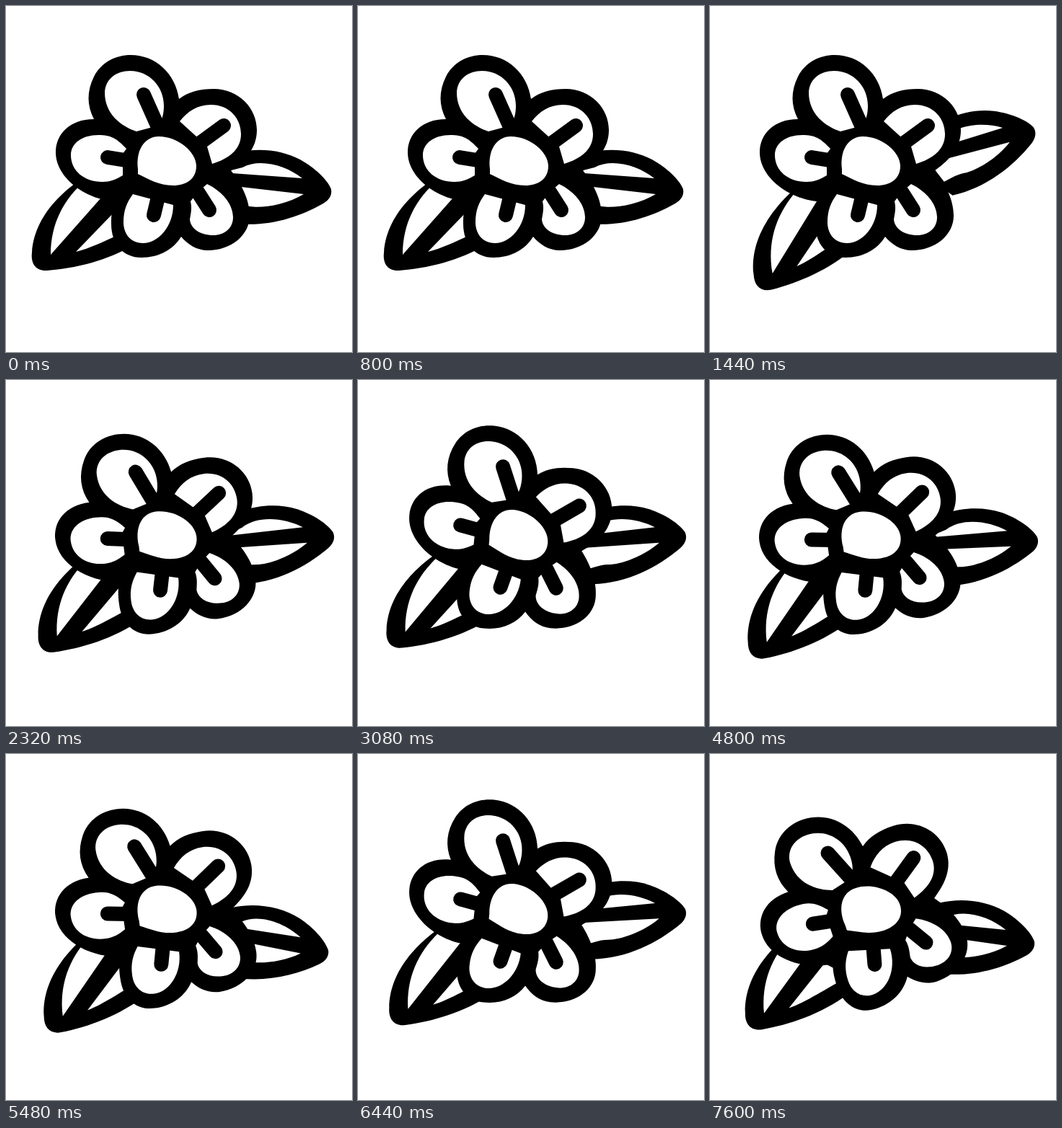
Animation, 480 px wide and 480 px high, one loop 7.68 s. Source, as an HTML page:

```html
<!DOCTYPE html>
<html lang="en">
<head>
<meta charset="utf-8">
<title>Wobbling flower</title>
<style>
html, body { margin: 0; width: 100%; height: 100%; overflow: hidden; background: #fff; }
svg { display: block; width: 100vw; height: 100vh; }
.hole { fill: #fff; }
.line { fill: none; stroke: #000; stroke-width: 20; stroke-linecap: round; }
</style>
</head>
<body>
<svg viewBox="0 0 480 480">
  <g id="left">
    <path d="M130 225C95 243 40 282 36 342C34 358 42 368 57 367C95 364 140 354 180 330L190 250Z"/>
    <path class="hole" d="M62 345C62 302 80 268 110 242L140 257ZM97 341L152 284L185 305C150 319 122 335 97 341Z"/>
  </g>
  <g id="right">
    <path d="M290 215C325 196 372 194 408 213C428 224 446 241 451 254C453 263 447 270 440 274C405 294 360 308 312 301L285 260Z"/>
    <path class="hole" d="M300 231L411 239C388 221 352 211 328 224ZM300 248L413 261C388 276 355 281 338 278C325 276 315 279 308 279L303 262Z"/>
  </g>
  <g id="flower">
    <path d="M122 157C112 138 112 118 122 98C132 78 152 68 173 68C208 68 235 94 240 129C253 119 269 115 288 115C323 115 348 142 348 172C348 195 335 212 312 228C326 246 338 268 338 291C338 318 312 339 280 339C265 339 252 331 243 320C232 338 212 349 188 349C162 349 146 330 146 302C146 289 147 281 150 271C110 268 69 238 69 203C69 178 88 157 122 157Z"/>
    <path class="hole" d="M137 120C138 101 153 90 172 90C199 90 219 112 219 138C219 152 216 158 211 166L181 174C160 167 137 150 137 120Z
      M241 160C252 146 266 137 284 137C310 137 326 156 326 178C326 199 309 212 286 219L279 195L263 180Z
      M90 207C90 190 106 179 128 179C146 179 154 184 167 198L162 205L162 235C152 241 144 244 134 244C108 244 90 228 90 207Z
      M176 261L232 276C232 306 211 329 190 329C172 329 163 315 163 300C163 283 168 272 176 261Z
      M279 247C300 257 315 275 315 293C315 309 302 318 288 318C268 318 256 308 255 296C257 285 258 280 256 271L266 258Z"/>
    <path class="line" d="M191 123L211 168M302 166L265 193M141 210L172 215M205 290L211 265M282 283L266 258"/>
    <path class="hole" d="M183 226C180 200 192 181 212 181C238 181 264 202 264 222C264 240 250 249 232 249C212 249 198 240 183 233Z"/>
  </g>
</svg>
<script>
const LOOP = 7680, BEAT = 480, MOVE = 3;

// Every part rests, then swings in MOVE poses: [first pose, degrees to reach]
const swings = {
  left: [[9, -10], [17, -1.6], [28, -13.5], [34, -2], [37, -7], [49, -3.2], [57, -5.5]],
  right: [[9, -21.4], [13, -10.5], [29, -2], [37, -9], [42, 4.7], [45, -9.7], [53, 1.5]],
  flower: [-7, 6, 1, -8, 6, -18].map((angle, i) => [13 + 8 * i, angle])
};

// Four drawn poses per beat, the first held longer
function poseAt(t) {
  const r = t % BEAT;
  return 4 * Math.floor(t / BEAT) + (r >= 200) + (r >= 320) + (r >= 400);
}

function angleAt(moves, pose) {
  let angle = 0;
  for (const [first, goal] of moves) {
    const u = Math.min(1, Math.max(0, (pose - first) / MOVE));
    angle += (goal - angle) * u * u * (3 - 2 * u);
  }
  return angle;
}

const start = performance.now();
function draw() {
  const pose = poseAt((performance.now() - start) % LOOP);
  for (const id in swings)
    document.getElementById(id).setAttribute('transform', `rotate(${angleAt(swings[id], pose)} 223 217)`);
  requestAnimationFrame(draw);
}
draw();
</script>
</body>
</html>
```
